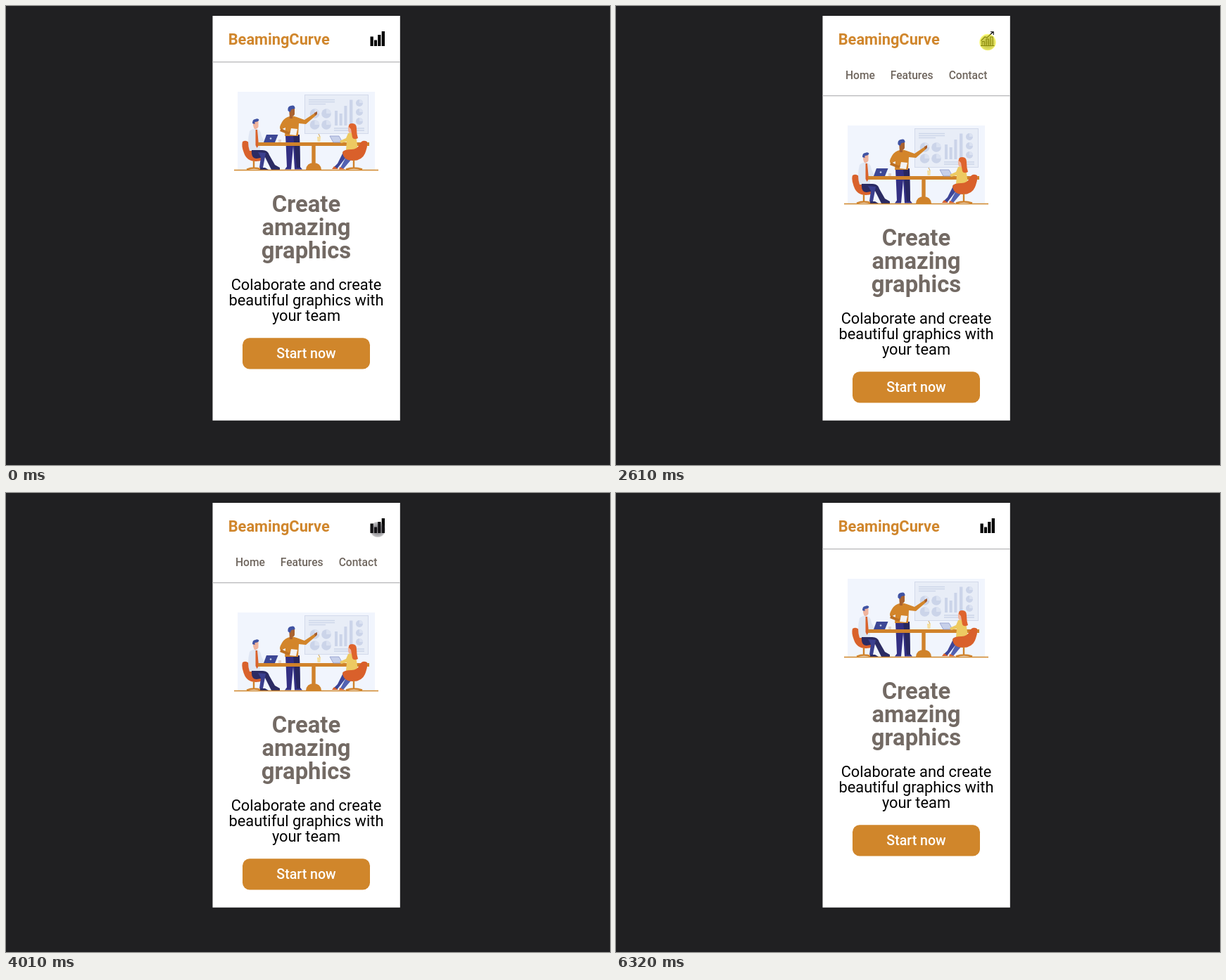
Recreate the animation shown at these times as an HTML page. Size 858 by 653 pixels, loop 6870 ms.

```html
<!DOCTYPE html>
<html lang="en">
<head>
<meta charset="utf-8">
<title>Mobile menu demo</title>
<style>
  html, body { margin: 0; width: 100%; height: 100%; overflow: hidden; background: #202022; }
  svg { display: block; }
  text { font-family: Roboto, Arial, sans-serif; }
  .mid { text-anchor: middle; }
  .brand { font-size: 21.8px; font-weight: 700; fill: #d0862c; }
  .nav { font-size: 15.6px; font-weight: 500; fill: #70675f; }
  .title { font-size: 32.8px; font-weight: 700; fill: #736a64; }
  .lead { font-size: 21.8px; fill: #000; }
  .cta { font-size: 19.6px; font-weight: 500; fill: #fff; }
</style>
</head>
<body>
<svg width="858" height="653" viewBox="0 0 858 653">
  <defs>
    <radialGradient id="touch">
      <stop offset="0" stop-color="#1c1a20" stop-opacity=".62"/>
      <stop offset=".6" stop-color="#2a2830" stop-opacity=".45"/>
      <stop offset=".88" stop-color="#3a3840" stop-opacity=".32"/>
      <stop offset="1" stop-color="#3a3840" stop-opacity="0"/>
    </radialGradient>
  </defs>
  <rect width="858" height="653" fill="#202022"/>
  <rect x="293.5" y="14" width="266.3" height="575.7" fill="#fff"/>

  <text class="brand" x="315.7" y="55">BeamingCurve</text>
  <g id="menu" class="nav">
    <text class="mid nav" x="347" y="104">Home</text>
    <text class="mid nav" x="420.2" y="104">Features</text>
    <text class="mid nav" x="500" y="104">Contact</text>
  </g>

  <g id="bars" fill="#000">
    <path d="M517.5 43.5h4.3V57h-4.3zM523 48.5h4V57h-4zM528.2 41h4.2v16h-4.2zM533.7 36h4.3v21h-4.3z"/>
  </g>
  <g id="line" fill="none" stroke="#000" stroke-width="1.1">
    <path d="M518 56.5h19.5M520 56v-5.5h3.2V56M526 56v-9h3.2v9M532 56V44h3.2v12"/>
    <path d="M518.5 49.5l5.5-5.5 3 1 8.5-8M532 36.8h4.2V41"/>
  </g>

  <g id="page">
    <rect x="293.5" y="79" width="266.3" height="1.3" fill="#b9b9bb"/>

    <rect x="329" y="122" width="195" height="111" fill="#f1f5fd"/>
    <rect x="424.5" y="126.5" width="90" height="55" fill="#e8edf7" stroke="#d3daeb"/>
    <g fill="none" stroke="#cdd6e9" stroke-width="1.3">
      <path d="M430 133.5h37M430 136.5h37M430 139.5h24M466 174h22M466 177h22M491 174h18M491 177h18"/>
    </g>
    <g id="pies" fill="#cbd4e9"></g>
    <path d="M467 149h4v21h-4zM473.7 153h4v17h-4zM480.4 142h4v28h-4zM488 133.5h4.4V170H488z" fill="#cbd4e9"/>

    <!-- seated man -->
    <path d="M336 193q7-4 11 5l3 9h17q4 0 2 6-3 8-14 8-13 0-17-12-4-10-2-16z" fill="#d9622c"/>
    <path d="M352 220v11M342 232.5q10-4 21 0" stroke="#d0812a" stroke-width="2.4" fill="none"/>
    <path d="M346 178q5-5 11-3 5 2 6 10l5 9-3 3-4-3v12h-15q-4-12 0-28z" fill="#dfe6f3"/>
    <path d="M354.5 176l2.5 0 2 22-2.5 4-2-4z" fill="#d9622c"/>
    <path d="M351 164h7.5v8q-2 4-5 3-3-2-2.5-11z" fill="#f0b49d"/>
    <path d="M350 167q0-6 4-6 4-2 5.5 1-1 3-6 3v3z" fill="#4053a3"/>
    <path d="M349 205h15q8 0 10 7l8 14 7 4v3h-12l-9-18-12 2q-8 0-7-12z" fill="#2b2b63"/>
    <path d="M358 208l11 1-4 21h-5l2-15z" fill="#3b3f8e"/>
    <path d="M361 230h7l5 3h-12z" fill="#2b2b63"/>
    <path d="M370 183h16.5L382 194h-16z" fill="#3d4795"/>
    <circle cx="376" cy="188.5" r="1.3" fill="#c6cfea"/>

    <!-- standing man -->
    <path d="M397 183h20l1 46 3 3.5h-11l-2-33-3 33h-9l3-4z" fill="#332f83"/>
    <path d="M408 184h9l1 46h-5z" fill="#282760"/>
    <path d="M400 158q6-3 13 0l11 4 15-10 2 3-15 13-10-1-1 18h-19l1-12-7 3q-2-3 0-7 4-9 10-11z" fill="#d3852a"/>
    <path d="M438 152l4-2v4l-3 2z" fill="#a45d31"/>
    <path d="M391 174l10 5 5-1v4h-7l-10-4z" fill="#bd7023"/>
    <path d="M405 174l9 1-2 9-9-1z" fill="#f3f2f2"/>
    <path d="M402 146h8v8q-1 3-3 3v3h-4z" fill="#a9622f"/>
    <path d="M400.5 149q-1-6 4-7 6-2 6 4l-5 1-2 4z" fill="#4053a3"/>

    <!-- table -->
    <rect x="358" y="194" width="158" height="5" fill="#d0822a"/>
    <path d="M434.3 199h5.4v25h-5.4zM426 233q1-10 11-10t11 10z" fill="#d0822a"/>
    <path d="M442 186h5l-.6 7h-3.8z" fill="#f5dfa0"/>
    <path d="M444 182l2 4" stroke="#d3a04c"/>
    <rect x="387" y="190" width="4" height="4" fill="#e1d6d5"/>

    <!-- seated woman -->
    <path d="M460 185h13l5 9h-13z" fill="#c7d0ea" stroke="#8e9acb" stroke-width=".8"/>
    <path d="M499 203l-19 3-9 18-5 5 4 3 14-18 18 1z" fill="#3e4597"/>
    <path d="M496 207l-12 6-9 17 4 2 11-13 13-4z" fill="#5362b2"/>
    <path d="M466 228l6 4h-9zM474 229l8 3.5h-9z" fill="#d9622c"/>
    <path d="M486 181q7-3 11 2l3 22h-17l1-12-8 2-2-3 9-4z" fill="#edca62"/>
    <path d="M486 171h6v9q-5 2-6-3z" fill="#f0b49d"/>
    <path d="M487 172q-1-5 5-5t6 7q0 8 2 14-6 3-8-1-1-6-2-12z" fill="#df642d"/>
    <path d="M513 193q-7-4-11 4-3 7-11 7-11 0-13 4 1 12 15 12 14 0 18-13 3-8 2-14z" fill="#d9602b"/>
    <path d="M494 219v12M483 232.5q11-4 23 0" stroke="#d0812a" stroke-width="2.4" fill="none"/>
    <path d="M324 233.5h205" stroke="#d0862b" stroke-width="1.5"/>

    <g class="mid">
      <text class="title" x="426.5" y="293">Create</text>
      <text class="title" x="426.5" y="325.8">amazing</text>
      <text class="title" x="426.5" y="358.6">graphics</text>
      <text class="lead" x="426.5" y="404">Colaborate and create</text>
      <text class="lead" x="426.5" y="426">beautiful graphics with</text>
      <text class="lead" x="426.5" y="447.7">your team</text>
      <rect x="336" y="472.2" width="181" height="44.2" rx="10" fill="#d0862b"/>
      <text class="cta" x="426.5" y="501.3">Start now</text>
    </g>
  </g>

  <circle id="finger" r="11.5" fill="url(#touch)"/>
  <path id="arrow" d="M0 0v16l3.7-3.5 2.4 5.6 2.3-1-2.4-5.4H11z" fill="#fff" stroke="#000" stroke-width=".8"/>
  <circle id="press" cx="528" cy="51.5" r="11.8" fill="#ff0" fill-opacity=".5"/>
</svg>
<script>
const LOOP = 6870, FADE = 500, SHIFT = 48, EDGE = 560;
const $ = id => document.getElementById(id);

// press start, release, last fade step, number of steps, fade finished
const taps = [
  [1360, 1530, 1910, 6, 2060],
  [2610, 2840, 3150, 5, 3300],
  [3760, 4010, 4320, 5, 4470],
  [5160, 5390, 5950, 8, 5950]
];

const addPie = (x, y, r) => {
  $('pies').innerHTML += `<circle cx="${x}" cy="${y}" r="${r}"/>` +
    `<path d="M${x} ${y}v${-r}a${r} ${r} 0 0 1 ${r} ${r}z" fill="#dbe2f1"/>`;
};
for (const x of [438.5, 455]) for (const y of [153, 169]) addPie(x, y, 6.8);
for (const y of [138, 151, 164]) addPie(502, y, 5);

const clamp = v => Math.min(1, Math.max(0, v));
const smooth = p => p * p * (3 - 2 * p);
const lerp = (a, b, p) => a.map((v, i) => v + (b[i] - v) * p);

// time held at the last of n even steps from a to b
function held(t, a, b, n) {
  const gap = (b - a) / (n - 1);
  return a + Math.min(n - 1, Math.floor((t - a) / gap + 1e-6)) * gap;
}

// the CSS "ease" curve
function ease(x) {
  let lo = 0, hi = 1, u = x;
  const bez = (a, b, s) => 3 * a * s * (1 - s) ** 2 + 3 * b * s * s * (1 - s) + s ** 3;
  for (let i = 0; i < 20; i++) {
    u = (lo + hi) / 2;
    if (bez(.25, .25, u) < x) lo = u; else hi = u;
  }
  return bez(.1, 1, u);
}

const rest = [528, 52], pause = [461, 84], out = [713, 500];

function pointer(t) {
  if (t < 220 || t >= 6320) return null;
  if (t < 310) return [549, 177];
  if (t < 540) return pause;
  if (t < 5390) {
    const p = clamp((held(t, 540, 1130, 9) - 466) / 664);
    return lerp(pause, rest, smooth(p));
  }
  if (t < 6180) return lerp(rest, out, smooth((held(t, 5390, 5950, 8) - 5390) / 560));
  return t < 6250 ? [752, 560] : [813, 637];
}

function show(el, on) { el.style.display = on ? '' : 'none'; }

function draw(t) {
  let open = false, chart = 0, pressed = false;
  for (const [down, up, last, n, done] of taps) {
    if (t >= down && t < up) pressed = true;
    if (t < up) continue;
    open = !open;
    const p = t >= done ? 1 : ease(clamp((held(t, up, last, n) - up) / FADE));
    chart = open ? p : 1 - p;
  }
  show($('menu'), open);
  show($('press'), pressed);
  $('page').setAttribute('transform', `translate(0 ${open ? SHIFT : 0})`);
  $('bars').setAttribute('opacity', 1 - chart);
  $('line').setAttribute('opacity', chart);

  const pos = pointer(t);
  const inside = pos && pos[0] < EDGE;
  show($('finger'), inside);
  show($('arrow'), pos && !inside);
  if (pos) $(inside ? 'finger' : 'arrow').setAttribute('transform', `translate(${pos})`);
}

const t0 = performance.now();
function tick() {
  draw((performance.now() - t0) % LOOP);
  requestAnimationFrame(tick);
}
draw(0);
requestAnimationFrame(tick);
</script>
</body>
</html>
```
